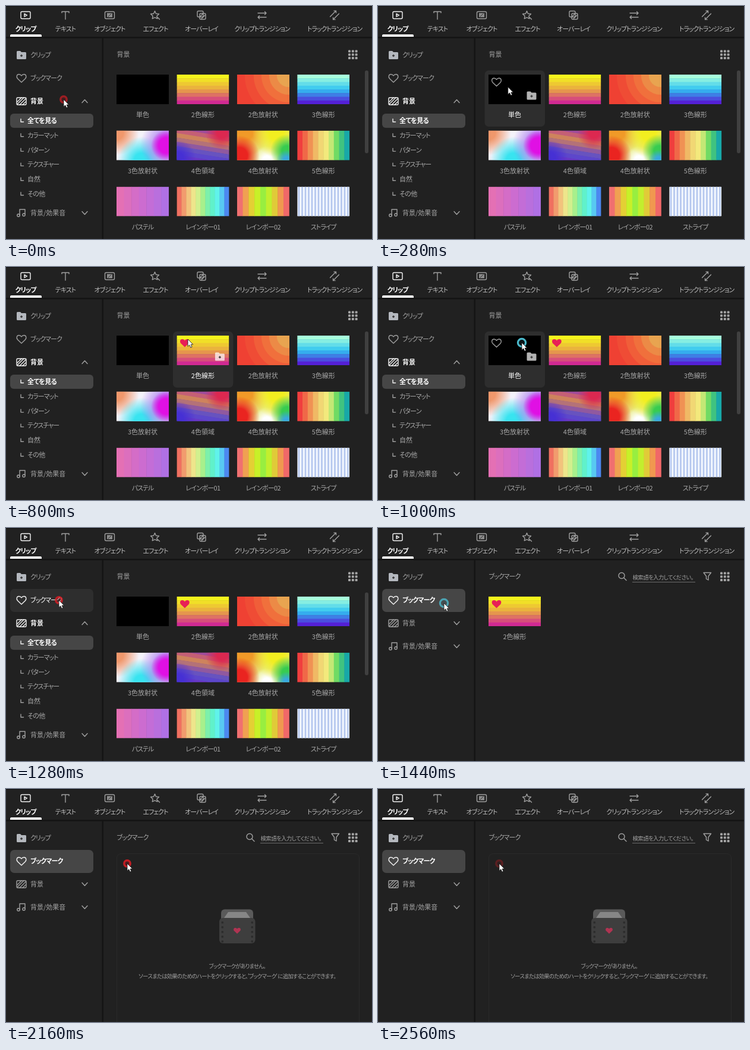
An HTML page for the animation above (2.6 s loop, 616 px wide and 394 px high).

```html
<!DOCTYPE html>
<html lang="ja">
<head>
<meta charset="utf-8">
<style>
html, body { margin: 0; width: 100%; height: 100%; overflow: hidden; background: #212121; }
svg { display: block; }
text { font: 11px "Noto Sans CJK JP", "Noto Sans CJK", sans-serif; font-feature-settings: "palt"; fill: #a8a8a8; }
.n { font-feature-settings: "hwid"; }
.b { font-weight: 700; fill: #fff; }
.hot text { fill: #fff; }
.s { font-size: 9.4px; fill: #a0a0a0; }
.m { text-anchor: middle; }
.i { fill: none; stroke: #a0a0a0; stroke-width: 1.4; stroke-linecap: round; stroke-linejoin: round; }
.on, #markItem.hot .i { stroke: #f4f4f4; }
.t { fill: #bcbcbc; }
</style>
</head>
<body>
<svg id="stage" width="616" height="394" viewBox="0 0 616 394"></svg>
<script>
const LOOP = 2600, STEP = 40;
const HEART = 'M0 7L-6.5 .8C-9-2-8-6.5-4.2-6.5C-2.3-6.5-.9-5.5 0-4C.9-5.5 2.3-6.5 4.2-6.5C8-6.5 9-2 6.5 .8Z';

const rect = (x, y, w, h, fill, r = 0, more = '') =>
  `<rect x="${x}" y="${y}" width="${w}" height="${h}" rx="${r}" fill="${fill}" ${more}/>`;
const path = (d, cls = 'i', more = '') => `<path d="${d}" class="${cls}" ${more}/>`;
const at = (x, y, body) => `<g transform="translate(${x} ${y})">${body}</g>`;

// Kana are set tighter than kanji, long vowel marks at half width
function text(x, y, s, cls = '') {
  const kana = (s.match(/[\u3040-\u30ff]/g) || []).length;
  const body = s.replace(/ー/g, '<tspan class="n">ー</tspan>');
  return `<text x="${x}" y="${y}" class="${cls}" letter-spacing="${(-kana / s.length).toFixed(2)}">${body}</text>`;
}

const heart = (x, y, fill, size = 1) => at(x, y, `<path d="${HEART}" fill="${fill}" transform="scale(${size})"/>`);
const heartLine = (x, y, cls = 'i') => at(x, y, path(HEART, cls));
const folder = (x, y, fill) => at(x, y,
  `<path d="M-8-5.5Q-8-7-6.5-7H-2L0-5H6.5Q8-5 8-3.5V5.5Q8 7 6.5 7H-6.5Q-8 7-8 5.5Z" fill="${fill}"/>` +
  path('M-2 1H2M0-1V3', '', 'stroke="#333" stroke-width="1.4"'));
const hatch = (x, y, cls = 'i') => at(x, y,
  rect(-8, -6, 16, 12, 'none', 1.5, `class="${cls}"`) +
  path('M-7 1L0-6M-7 5L4-6M-3 6L7-4M2 6L7 1', cls));
const note = (x, y) => at(x, y, path('M-3 4V-6H6V2') +
  '<circle class="i" cx="-5" cy="4" r="2.2"/><circle class="i" cx="4" cy="3" r="2.2"/>');
const chevron = (y, up) => at(132.5, y, path(up ? 'M-4.5 2.5L0-2.5L4.5 2.5' : 'M-4.5-2.5L0 2.5L4.5-2.5'));

// Swatches
const rgb = c => [1, 3, 5].map(i => parseInt(c.slice(i, i + 2), 16));
function ramp(stops, u) {
  const p = u * (stops.length - 1), i = Math.min(stops.length - 2, Math.floor(p));
  const a = rgb(stops[i]), b = rgb(stops[i + 1]);
  return `rgb(${a.map((v, k) => Math.round(v + (b[k] - v) * (p - i)))})`;
}
function bands(n, across, ...stops) {
  let out = '';
  for (let i = 0; i < n; i++) {
    const c = ramp(stops, i / (n - 1));
    out += across ? rect(i * 88 / n, 0, 88 / n + .5, 50, c) : rect(0, i * 50 / n, 88, 50 / n + .5, c);
  }
  return out;
}
let glowId = 0;
function glow(x, y, r, c, core = .3) {
  const id = 'g' + glowId++;
  return `<radialGradient id="${id}"><stop offset="${core}" stop-color="${c}"/>` +
    `<stop offset="1" stop-color="${c}" stop-opacity="0"/></radialGradient>` +
    `<circle cx="${x}" cy="${y}" r="${r}" fill="url(#${id})"/>`;
}
const rings = () => [74, 59, 46, 33, 20].map((r, i) =>
  `<circle cx="87" cy="1" r="${r}" fill="${ramp(['#ef4c35', '#f0703c', '#e8a450'], i / 4)}"/>`).join('');
const stripes = () => {
  let out = rect(0, 0, 88, 50, '#f4f8ff');
  for (let x = 1.5; x < 88; x += 5.5) out += rect(x, 0, 2.6, 50, '#b4c6ee');
  return out;
};
const sunset = bands(8, 0, '#f5f51c', '#e8a842', '#d02a92');

const swatches = [
  ['単色', rect(0, 0, 88, 50, '#000')],
  ['2色線形', sunset],
  ['2色放射状', rect(0, 0, 88, 50, '#ef4133') + rings()],
  ['3色線形', bands(8, 0, '#a8ffdc', '#30c4f2', '#5420d6')],
  ['3色放射状', rect(0, 0, 88, 50, '#f4f2fa') + glow(0, 4, 38, '#f0986c') + glow(42, 50, 40, '#38e4f0') +
    glow(86, 24, 46, '#a878f0') + glow(84, 25, 26, '#e010e4', .5)],
  ['4色領域', `<g transform="rotate(9 44 25) scale(1.3) translate(-12 -8)">${bands(9, 0, '#6a44c8', '#c05080', '#d08a58', '#985a98', '#5650cc', '#6838c8')}</g>` +
    glow(76, 4, 28, '#dc2850') + glow(2, 46, 30, '#4630d4')],
  ['4色放射状', rect(0, 0, 88, 50, '#e8ec88') + glow(50, 50, 24, '#ffffff') + glow(14, 4, 40, '#f09a28') + glow(66, 4, 40, '#f2ee20') +
    glow(84, 34, 28, '#38cc50') + glow(84, 50, 18, '#38a8e0') + glow(4, 42, 34, '#ea2420', .4)],
  ['5色線形', bands(10, 1, '#f03e3e', '#f08a50', '#f0d070', '#f4f080', '#60d860', '#18a8a8')],
  ['パステル', bands(7, 1, '#e470b4', '#cc6cd0', '#b070e4')],
  ['レインボー01', bands(11, 1, '#f07060', '#f4b878', '#ecf090', '#a8f08c', '#60f0c0', '#60f4f4', '#4c88f0')],
  ['レインボー02', bands(9, 1, '#f07070', '#f0b048', '#d8f020', '#98ee40', '#d0ee28', '#f0a848', '#f06868')],
  ['ストライプ', stripes()]
];

// One thumbnail: hover plate, swatch, hover tools, bookmark heart, label
const tile = (id, x, y, [name, art], plate) => `<g id="${id}">` +
  rect(x - 6.5, y - 7, 101.5, 95, plate, 7, 'class="hov"') +
  `<svg x="${x}" y="${y}" width="88" height="50">${art}</svg>` +
  `<g class="hov">${folder(x + 72.5, y + 35.5, 'rgba(255,255,255,.7)')}</g>` +
  `<g class="line">${heartLine(x + 13.5, y + 12.5)}</g>` +
  `<g class="fav">${heart(x + 13.5, y + 12.5, '#e81f56')}</g>` +
  text(x + 44, y + 72, name, 'm') + '</g>';

const tileX = i => 186 + (i % 4) * 101.4, tileY = i => 116 + Math.floor(i / 4) * 94.8;

const swap = path('M-7-3.5H7L4.5-6M7-3.5L4.5-1M7 3.5H-7L-4.5 1M-7 3.5L-4.5 6');
const tabs = [
  [33, 'クリップ', rect(-8, -6, 16, 12, 'none', 2, 'class="i on"') + path('M-2-2.5L2.5 0L-2 2.5Z', 'i on')],
  [100, 'テキスト', path('M-6-4V-6H6V-4M0-6V7')],
  [174.5, 'オブジェクト', rect(-8, -6, 16, 12, 'none', 2, 'class="i"') + rect(-4.5, -3.5, 9, 7, '#8a8a8a') + path('M-3 3L3-3', '', 'stroke="#333"')],
  [251.5, 'エフェクト', path('M-1-7L1-2.5L6-2L2.3 1.4L3.2 6L-1 3.8L-5.2 6L-4.3 1.4L-8-2L-3-2.5ZM4 4L7 7')],
  [329, 'オーバーレイ', rect(-7, -7, 10, 10, 'none', 2, 'class="i"') + rect(-3, -3, 10, 10, '#212121', 2, 'class="i"') + path('M-2 2L2-2M0 6L6 0')],
  [431, 'クリップトランジション', swap],
  [553, 'トラックトランジション', `<g transform="rotate(-45)">${swap}</g>`]
];

const dots = () => {
  let out = '';
  for (let i = 0; i < 9; i++) out += rect(576 + i % 3 * 5.8, 74.5 + Math.floor(i / 3) * 5.8, 4, 4, '#a4a4a4', 1.2);
  return out;
};

const chrome = rect(0, 0, 616, 394, '#212121') + rect(0, 0, 616, 1, '#101010') +
  rect(0, 52, 616, 2.5, '#141414') + rect(161.5, 54, 2.5, 340, '#141414') +
  tabs.map(([x, s, icon], i) => at(x, 15.5, icon) + text(x, 43, s, i ? 'm t' : 'm b')).join('') +
  path('M7 52V50Q7 48 9 48H58Q60 48 60 50V52Z', '', 'fill="#fff"') +
  folder(26, 83, '#b4b8be') + text(41, 87, 'クリップ') + dots();

const subs = ['全てを見る', 'カラーマット', 'パターン', 'テクスチャー', '自然', 'その他'];
const browse = '<g id="browse">' +
  rect(7, 103, 140, 39, '#2e2e2e', 7, 'id="markHover"') +
  `<g id="markItem">${heartLine(26, 122)}${text(41, 126, 'ブックマーク')}</g>` +
  hatch(26, 161, 'i on') + text(41, 165, '背景', 'b') + chevron(161, true) +
  rect(7, 182, 140, 24, '#464646', 6) +
  subs.map((s, i) => {
    const y = 194 + i * 24.8;
    return path(`M25 ${y - 3}V${y + 2}H29.5`, i ? 'i' : 'i on') + text(36, y + 4, s, i ? '' : 'b');
  }).join('') +
  note(26, 350) + text(41, 354, '背景/効果音') + chevron(350) +
  text(186.5, 86, '背景') + rect(604, 109, 6, 140, '#404040', 3) +
  swatches.map((s, i) => tile('tile' + i, tileX(i), tileY(i), s, '#2e2e2e')).join('') + '</g>';

const marks = '<g id="marks">' +
  rect(7, 103, 140, 39, '#464646', 7) + heartLine(26, 122, 'i on') + text(41, 126, 'ブックマーク', 'b') +
  hatch(26, 161) + text(41, 165, '背景') + chevron(161) +
  note(26, 200) + text(41, 204, '背景/効果音') + chevron(200) +
  text(186.5, 86, 'ブックマーク') +
  '<circle class="i" cx="410" cy="80.5" r="5"/>' + path('M414 84.5L418 88.5') +
  text(428.5, 86.5, '検索語を入力してください。', 's') + rect(428, 91, 106, 1, '#6c6c6c') +
  path('M548 75.5H560.5L556 81.5V88L552.5 86V81.5Z') +
  tile('saved', 186, 116, ['2色線形', sunset], '#343434') + '</g>';

const holes = () => {
  let out = '';
  for (let y = 224; y < 260; y += 8) out += rect(362.5, y, 3.5, 3.5, '#2c2c2c', 1) + rect(412.5, y, 3.5, 3.5, '#2c2c2c', 1);
  return out;
};
const empty = '<g id="empty">' +
  rect(186.5, 109.5, 408, 320, 'none', 7, 'stroke="#2a2a2a"') +
  rect(362, 203.5, 54, 30, '#5a5a5a', 6) + path('M374 208H404L411 218H367Z', '', 'fill="#868686"') +
  rect(359, 218, 60.5, 43, '#3e3e3e', 6) + holes() + heart(389, 239.5, '#b03452', .75) +
  text(389, 303, 'ブックマークがありません。', 'm s') +
  text(389, 320, "ソースまたは効果のためのハートをクリックすると、'ブックマーク' に追加することができます。", 'm s') + '</g>';

const pointer = '<g id="pointer"><circle id="press" r="5.2" fill="rgba(200,20,30,.3)" stroke="#e01c24" stroke-width="3.4"/>' +
  '<circle id="release" r="6.6" fill="rgba(70,150,165,.15)" stroke="#4fc3d6" stroke-width="3.2"/>' +
  path('M0 0V12.4L2.8 9.8L4.8 14.2L7 13.2L5.1 9H8.8Z', '', 'fill="#fff" stroke="#111" stroke-width=".8"') + '</g>';

const $ = id => document.getElementById(id);
$('stage').innerHTML = chrome + browse + marks + empty + pointer;

// Each stop: time, x, y, easing on the way there
const ease = {
  io: u => u * u * (3 - 2 * u),
  in: u => u * u,
  out: u => 1 - (1 - u) * (1 - u),
  lin: u => u
};
const route = [
  [0, 97, 158], [80, 97, 158], [440, 306, 122, 'io'], [840, 306, 122],
  [1000, 242, 128, 'in'], [1240, 89, 122, 'out'], [1340, 89, 122],
  [1440, 111, 127, 'in'], [1760, 204, 126, 'out'], [LOOP, 204, 126]
];
const red = [[0, .65], [120, 0], [440, 0], [520, 1], [680, 0], [1200, 0], [1280, .8], [1360, 0], [2000, 0], [2120, .9], [2560, .3], [LOOP, .28]];
const cyan = [[0, 0], [900, 0], [960, .95], [1000, .95], [1080, 0], [1340, 0], [1400, .8], [1440, .75], [1560, 0], [1880, 0], [1960, .65], [2080, 0], [LOOP, 0]];

function sample(keys, t, k) {
  const i = Math.max(1, keys.findIndex(q => q[0] > t)), a = keys[i - 1], b = keys[i];
  return a[k] + (b[k] - a[k]) * ease[b[3] || 'lin']((t - a[0]) / (b[0] - a[0]));
}
const show = (el, on) => el.style.display = on ? '' : 'none';

function setTile(id, x, y, px, py, fav) {
  const el = $(id);
  const over = px >= x - 6.5 && px < x + 95 && py >= y - 7 && py < y + 88;
  el.classList.toggle('hot', over);
  el.querySelectorAll('.hov').forEach(e => show(e, over));
  show(el.querySelector('.line'), over && !fav);
  show(el.querySelector('.fav'), fav);
}

function draw(t) {
  const x = sample(route, t, 1), y = sample(route, t, 2);
  const opened = t >= 1360, cleared = t >= 2040;
  show($('browse'), !opened);
  show($('marks'), opened);
  show($('saved'), !cleared);
  show($('empty'), cleared);
  swatches.forEach((s, i) => setTile('tile' + i, tileX(i), tileY(i), x, y, i === 1 && t >= 600));
  setTile('saved', 186, 116, x, y, true);
  const over = x > 7 && x < 147 && y > 103 && y < 142;
  show($('markHover'), over);
  $('markItem').classList.toggle('hot', over);
  $('pointer').setAttribute('transform', `translate(${x.toFixed(1)} ${y.toFixed(1)})`);
  $('press').setAttribute('opacity', sample(red, t, 1));
  $('release').setAttribute('opacity', sample(cyan, t, 1));
}

const start = performance.now();
function tick() {
  const t = Math.max(0, performance.now() - start) % LOOP;
  draw(Math.floor(t / STEP) * STEP);
  requestAnimationFrame(tick);
}
draw(0);
requestAnimationFrame(tick);
</script>
</body>
</html>
```
